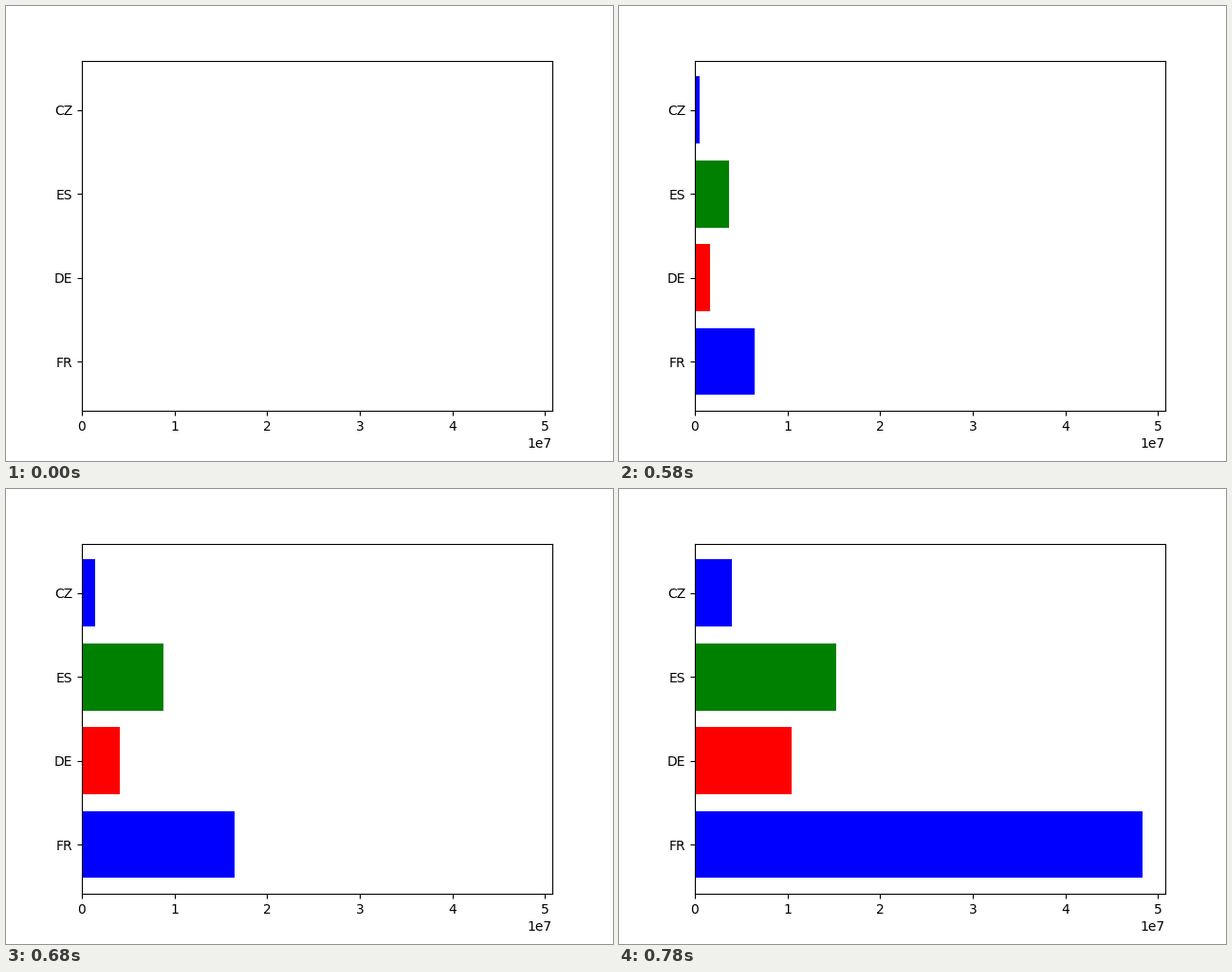
These frames come from a looping animation (640 by 480 pixels, 800 ms). A matplotlib script:

```python
import matplotlib.pyplot as plt
from matplotlib.animation import FuncAnimation

INTERVAL = 20
FRAMES = 40
START, KNEE, END = 25, 34, 39  # slow growth up to the knee, then fast

# country: (colour, totals in millions at start, knee and end)
COUNTRIES = {
    "FR": ("blue", 0, 16.5, 48.36),
    "DE": ("red", 0, 4.1, 10.45),
    "ES": ("green", 0.3, 8.8, 15.25),
    "CZ": ("blue", 0, 1.43, 4.0),
}


def total(frame, first, middle, last):
    if frame < START:
        return 0
    if frame <= KNEE:
        progress = (frame - START) / (KNEE - START)
        return first + (middle - first) * progress ** 1.15
    return middle + (last - middle) * (frame - KNEE) / (END - KNEE)


fig, ax = plt.subplots(figsize=(6.4, 4.8), dpi=100)
bars = ax.barh(list(COUNTRIES), [0] * len(COUNTRIES),
               color=[color for color, *_ in COUNTRIES.values()])
ax.set_xlim(0, 1.05e6 * COUNTRIES["FR"][-1])
ax.set_ylim(-0.59, 3.59)


def update(frame):
    for bar, (_, *totals) in zip(bars, COUNTRIES.values()):
        bar.set_width(1e6 * total(frame, *totals))
    return bars.patches


anim = FuncAnimation(fig, update, frames=FRAMES, interval=INTERVAL,
                     repeat=True, repeat_delay=0)
plt.show()
```
